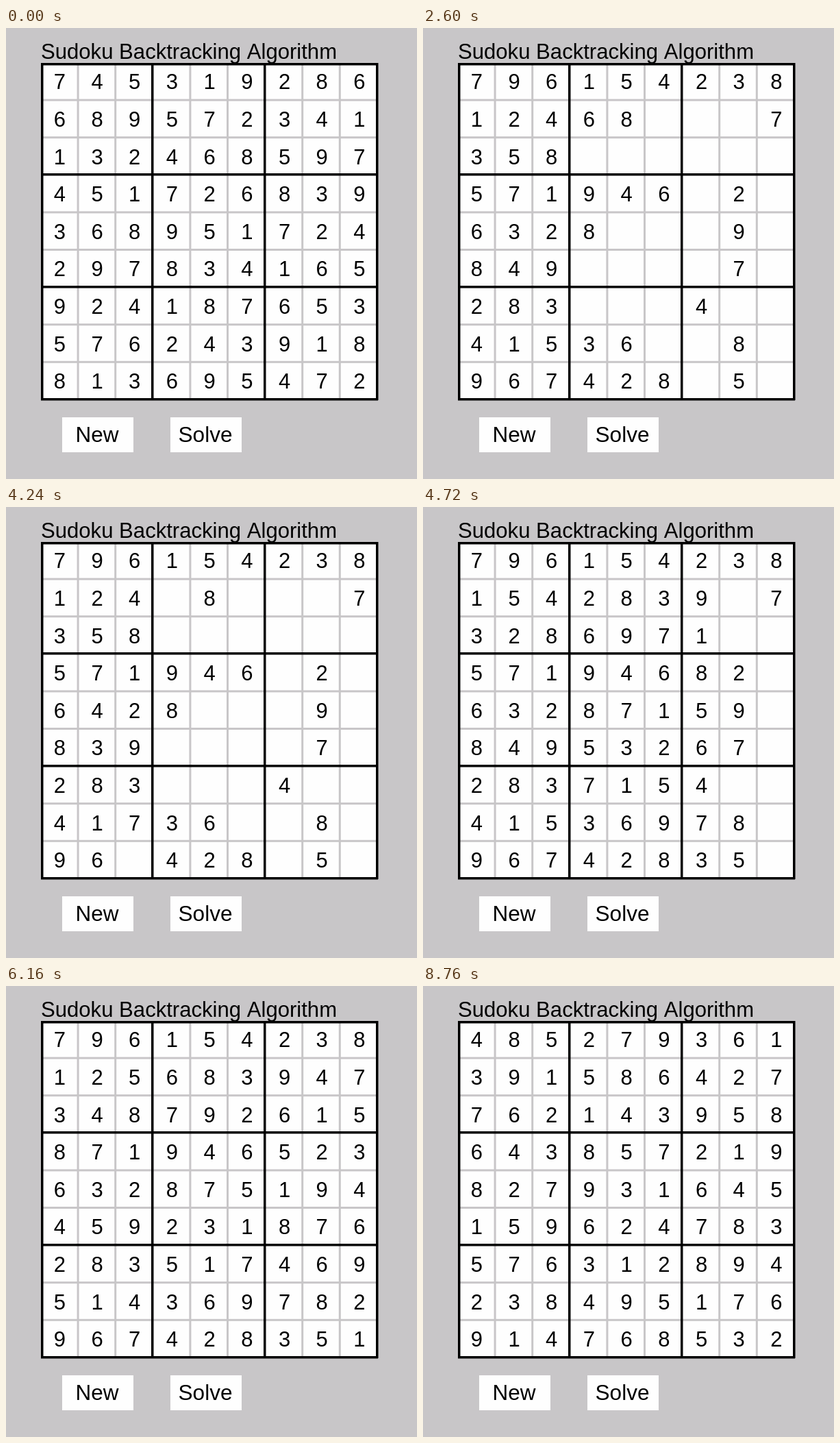
An HTML page with a canvas that plays this animation: 600 px wide and 658 px high, repeating every 9 s.

```html
<!DOCTYPE html>
<html lang="en">
<head>
<meta charset="utf-8">
<title>Sudoku Backtracking Algorithm</title>
<style>
html, body { margin: 0; width: 100%; height: 100%; overflow: hidden; background: #c8c6c8; }
canvas { display: block; }
</style>
</head>
<body>
<canvas id="stage" width="600" height="658"></canvas>
<script>
const ctx = document.getElementById('stage').getContext('2d');
const LOOP = 9000, TICK = 40;
const GREY = '#c8c6c8', WHITE = '#fefefe', BLACK = '#000';

// Boards are written row by row; a dot is an empty cell.
const first = '745319286 689572341 132468597 451726839 368951724 297834165 924187653 576243918 813695472'.split(' ');
const second = '796154238 1...8...7 3.8...... .71946.2. 6.28...9. ..9....7. 28....4.. .1.36..8. 96.428.5.'.split(' ');
const third = '485279361 391586427 762143958 643857219 827931645 159624783 576312894 238495176 914768532'.split(' ');

// Empty cells in solving order: down each column, then left to right.
function holes(rows) {
  const list = [];
  for (let c = 0; c < 9; c++)
    for (let r = 0; r < 9; r++)
      if (rows[r][c] === '.') list.push([r, c]);
  return list;
}

function fits(grid, r, c, d) {
  for (let i = 0; i < 9; i++) {
    const br = r - r % 3 + Math.floor(i / 3), bc = c - c % 3 + i % 3;
    if (grid[r][i] === d || grid[i][c] === d || grid[br][bc] === d) return false;
  }
  return true;
}

// Every step of the search, as the digits placed so far.
function search(rows) {
  const grid = rows.map(row => [...row]), open = holes(rows), steps = [''];
  function visit(path) {
    if (path.length === open.length) return true;
    const [r, c] = open[path.length];
    for (const d of '123456789') {
      if (!fits(grid, r, c, d)) continue;
      grid[r][c] = d;
      steps.push(path + d);
      if (visit(path + d)) return true;
      grid[r][c] = '.';
      steps.push(path);
    }
    return false;
  }
  visit('');
  return steps;
}

const steps = search(second);
const pace = [
  [2040, ''],
  [2600, '584253443576'],
  [3480, '584253445736257713939721591856'],
  [4240, '5842543437'],
  [5240, '58452344753672597']
].map(([time, path]) => [time, path ? steps.lastIndexOf(path) : 0]);
pace.push([6160, steps.length - 1]);

function pathAt(t) {
  if (t <= pace[0][0]) return '';
  for (let i = 1; i < pace.length; i++) {
    const [t0, s0] = pace[i - 1], [t1, s1] = pace[i];
    if (t <= t1) return steps[Math.round(s0 + (s1 - s0) * (t - t0) / (t1 - t0))];
  }
  return steps[steps.length - 1];
}

let seed = 11;
function random() {
  seed = (seed * 16807) % 2147483647;
  return seed / 2147483647;
}
const thirdStart = third.map(row => [...row].map(d => random() < 0.48 ? d : '.').join(''));
const thirdPath = holes(thirdStart).map(([r, c]) => third[r][c]).join('');

function rect(x, y, w, h, color) {
  ctx.fillStyle = color;
  ctx.fillRect(x, y, w, h);
}

function label(text, x, y, size, align) {
  ctx.font = size + 'px "Liberation Sans", Arial, sans-serif';
  ctx.textAlign = align;
  ctx.fillStyle = BLACK;
  ctx.fillText(text, x, y);
}

function button(text, x) {
  rect(x, 568, 104, 51, WHITE);
  label(text, x + 51, 604, 31.5, 'center');
}

function digit(d, r, c) {
  if (d !== '.') label(d, 78.3 + 54.7 * c, 89.2 + 54.65 * r, 31, 'center');
}

function drawBoard(rows, path) {
  rect(52, 52, 490, 490, WHITE);
  for (let i = 1; i < 9; i++) {
    if (i % 3 === 0) continue;
    const p = 50.3 + 54.6 * i - 1.3;
    rect(p, 52, 3, 490, GREY);
    rect(52, p, 490, 3, GREY);
  }
  for (const p of [51, 212, 376, 540]) {
    rect(p, 51, 3.5, 492, BLACK);
    rect(51, p, 492, 3.5, BLACK);
  }
  rows.forEach((row, r) => [...row].forEach((d, c) => digit(d, r, c)));
  const open = holes(rows);
  [...path].forEach((d, i) => digit(d, ...open[i]));
}

function draw(time) {
  const t = Math.floor(time % LOOP / TICK) * TICK;
  rect(0, 0, 600, 658, GREY);
  label('Sudoku Backtracking Algorithm', 51, 44.5, 31.1, 'left');
  if (t < 1480) drawBoard(first, '');
  else if (t < 7800) drawBoard(second, pathAt(t));
  else {
    const done = Math.min(1, Math.max(0, (t - 8520) / 240));
    drawBoard(thirdStart, thirdPath.slice(0, Math.round(done * thirdPath.length)));
  }
  button('New', 82);
  button('Solve', 240);
}

const start = performance.now();
function loop() {
  draw(performance.now() - start);
  requestAnimationFrame(loop);
}
loop();
</script>
</body>
</html>
```
